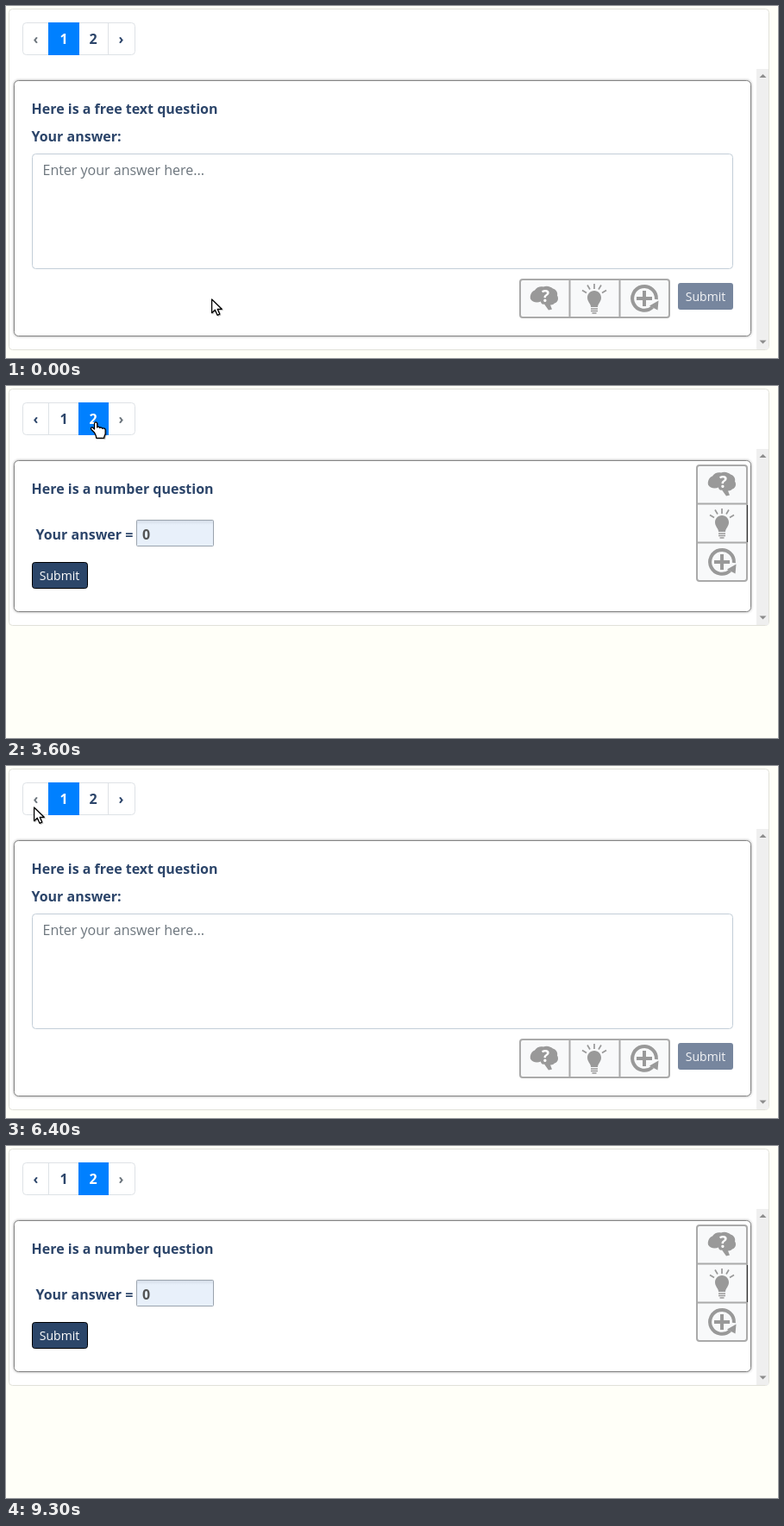
Animation of 895x408 px, one loop 9800 ms. Source, as an HTML page:

```html
<!DOCTYPE html>
<html lang="en">
<head>
<meta charset="utf-8">
<title>Question pager</title>
<style>
  html, body { margin: 0; width: 100%; height: 100%; overflow: hidden; background: #fffff8; }
  svg { display: block; width: 895px; height: 408px; font: 16px "Open Sans", sans-serif; }
  .bold { font-weight: 700; fill: #2c456a; }
  .mid { text-anchor: middle; }
</style>
</head>
<body>
<svg id="stage" viewBox="0 0 895 408">
  <defs>
    <filter id="glow" x="-5%" y="-5%" width="110%" height="115%">
      <feDropShadow dx="0" dy="0" stdDeviation="1.6" flood-color="#000" flood-opacity=".4"/>
    </filter>
    <filter id="soft" x="-30%" y="-30%" width="180%" height="180%">
      <feDropShadow dx="1" dy="1" stdDeviation=".7" flood-color="#000" flood-opacity=".25"/>
    </filter>
    <linearGradient id="inset" x2="0" y2="1">
      <stop offset="0" stop-color="#d3dbe6"/>
      <stop offset=".18" stop-color="#e8f0fa"/>
    </linearGradient>
    <g id="brain">
      <path fill="#999" d="M-16 1C-17-4-14-8-11-9C-9-13-4-14-1-13C3-15 8-13 10-11C14-10 16-6 15-3C17 0 16 5 12 6C10 8 8 8 7 8L9 13L5 14L0 7C-2 8-4 6-4 4C-8 6-14 5-16 1Z"/>
      <text class="mid" x="1.5" y="4" font-size="19" font-weight="700" fill="#fff">?</text>
    </g>
    <g id="bulb" fill="#999">
      <path d="M0-9C5-9 8-5 8-1C8 4 4 6 4 10H-4C-4 6-8 4-8-1C-8-5-5-9 0-9Z"/>
      <path fill="none" stroke="#999" stroke-width="1.6" d="M-4 12H4M-4 14.5H4M-2.5 17H2.5"/>
      <path fill="none" stroke="#999" stroke-width="1.7" d="M0-17V-11M-8-15.500L-5-10.500M8-15.500L5-10.500M-14-9.500L-9-6.500M14-9.500L9-6.500"/>
    </g>
    <g id="retry" fill="none" stroke="#999" stroke-width="4">
      <path d="M13.900 1A13.900 13.900 0 1 0 9.500 10.100M-9 0H9M0-9V9"/>
      <path fill="#999" stroke="none" d="M16.500 2.500L15.500 13.500L6 8.500Z"/>
    </g>
  </defs>
  <g id="free"></g>
  <g id="number"></g>
  <g id="pager"></g>
  <g id="cursor" filter="url(#soft)" stroke-linejoin="round">
    <path id="arrow" fill="#fff" stroke="#000" stroke-width="1.3" d="M.600 1V16.700L4.300 13.300L7 19.300L9.700 18.100L7.200 12.300H12.200Z"/>
    <path id="hand" fill="#fff" stroke="#000" stroke-width="1.3" d="M-1.500 12L-5 8.500C-6.500 6.500-4.500 5-3 6.500L-1.500 8V1.500C-1.500-.500 1.700-.500 1.700 1.500V6C2.500 4.800 4.500 5.200 4.700 6.500C5.700 5.500 7.500 6 7.800 7.300C9 6.500 11.200 7.300 11.200 9V13C11.200 15 9.700 15.500 9.700 18.300H.700C.700 15.500-.500 14-1.500 12Z"/>
    <g id="beam" fill="none">
      <path stroke="#fff" stroke-width="3.500" d="M-3.500-7H3.500M0-7V8M-3.500 8H3.500"/>
      <path stroke="#000" stroke-width="1.800" d="M-3.500-7H3.500M0-7V8M-3.500 8H3.500"/>
    </g>
  </g>
</svg>
<script>
const LOOP = 9800;
const $ = id => document.getElementById(id);

const rect = (x, y, w, h, fill, stroke = 'none', r = 0, extra = '') =>
  `<rect x="${x}" y="${y}" width="${w}" height="${h}" rx="${r}" fill="${fill}" stroke="${stroke}" ${extra}/>`;
const text = (x, y, str, attrs = 'class="bold"') => `<text x="${x}" y="${y}" ${attrs}>${str}</text>`;
const line = (d, color, width = 1) => `<path d="${d}" stroke="${color}" stroke-width="${width}" fill="none"/>`;
const icon = (id, x, y) => `<use href="#${id}" x="${x}" y="${y}"/>`;

// Panel, scrollbar and card, down to the given panel bottom
function frame(bottom) {
  const tip = bottom - 6.5;
  return rect(3.5, 3.5, 881, bottom - 3, '#fff', '#e1e1d9', 4) +
    rect(870, 73, 14, bottom - 73, '#efefef') +
    `<path fill="#8c8c8c" d="M873.500 83L877.500 79L881.500 83ZM873.500 ${tip - 4}L877.500 ${tip}L881.500 ${tip - 4}Z"/>` +
    rect(9.5, 86.5, 854, bottom - 102, '#fff', '#858585', 5, 'filter="url(#glow)"');
}

const submit = (x, y, fill, stroke, color) =>
  rect(x + .5, y + .5, 64, 30, fill, stroke, 3) +
  text(x + 32, y + 21, 'Submit', `class="mid" font-size="14" fill="${color}"`);

$('free').innerHTML = frame(398) +
  text(29.5, 125, 'Here is a free text question') +
  text(29.5, 156.5, 'Your answer:') +
  rect(30.5, 171.5, 812, 133, '#fff', '#c3ced8', 4) +
  text(42.5, 196, 'Enter your answer here...', 'fill="#6c757d"') +
  rect(596, 317, 173, 44, '#f8f9fa', '#aaa', 3, 'stroke-width="2"') +
  line('M653.500 317V361M711.500 317V361', '#aaa', 2) +
  icon('brain', 624, 338.5) + icon('bulb', 682, 339) + icon('retry', 740, 339) +
  rect(779, 321, 64, 31, '#77869e', 'none', 3) +
  text(811, 342, 'Submit', 'class="mid" font-size="14" fill="#f4f5f7"');

$('number').innerHTML = frame(277) +
  text(29.5, 125, 'Here is a number question') +
  text(34.5, 178, 'Your answer =') +
  rect(151.5, 155.5, 89, 30, 'url(#inset)', '#9aa3ad', 1) +
  text(158, 178, '0', 'font-weight="700" fill="#555"') +
  submit(30, 204, '#2c4669', '#000', '#fff') +
  rect(801, 92, 58, 134, '#f8f9fa', '#aaa', 3, 'stroke-width="2"') +
  line('M801 136.500H859M801 181.500H859', '#aaa', 2) +
  line('M859.500 138V181', '#333') +
  icon('brain', 830, 113.500) + icon('bulb', 830, 159) + icon('retry', 830, 204);

const EDGES = [19, 49, 84, 118, 149];
const LABELS = ['‹', '1', '2', '›'];
const CENTERS = [34.5, 67, 101, 133.5];

function drawPager(page, hover, focus) {
  const disabled = page === 1 ? 0 : 3;
  let out = rect(19.5, 19.5, 130, 37, '#fff', '#dee2e6', 4);
  if (hover >= 0 && hover !== page && hover !== disabled) {
    const x = EDGES[hover];
    out += rect(x + .5, 19.5, EDGES[hover + 1] - x, 37, '#e9ecef', '#dee2e6', hover % 3 ? 0 : 4);
  }
  out += line('M49.500 20V56M84.500 20V56M118.500 20V56', '#dee2e6');
  const width = page === 1 && hover === 2 ? 35 : EDGES[page + 1] - EDGES[page] + 1;
  out += rect(EDGES[page], 19, width, 38, '#0080ff');
  if (focus) out += rect(117, 17.5, 34, 41, 'none', '#bfdeff', 5, 'stroke-width="3"');
  LABELS.forEach((label, i) => {
    const fill = i === page ? '#fff' : i === disabled ? '#6c757d' : i === hover ? '#0056b3' : '#2c456a';
    out += text(CENTERS[i], 44, label, `class="mid" font-weight="700" fill="${fill}"`);
  });
  $('pager').innerHTML = out;
}

// Pointer moves: start time, number of 100 ms steps, then start, control and end points
const MOVES = [
  [900, 7, [238, 339], [215, 240], [156, 192]],
  [1900, 6, [156, 192], [140, 120], [110, 73]],
  [2600, 3, [110, 73], [107, 58], [104, 42]],
  [4900, 10, [104, 42], [80, 104], [39, 49]],
  [5900, 1, [39, 49], [35, 48], [32, 47]],
  [7000, 10, [32, 47], [70, 80], [127, 56]],
  [8000, 2, [127, 56], [130, 53], [132, 50]],
  [9000, 4, [132, 50], [114, 14], [96, -24]]
];

function pointerAt(t) {
  const move = MOVES.filter(m => m[0] <= t).pop();
  if (!move) return MOVES[0][2];
  const [start, steps, a, c, b] = move;
  const k = Math.min(1, (Math.floor((t - start) / 100) + 1) / steps);
  const u = k * k * (3 - 2 * k);
  return [0, 1].map(i => Math.round((1 - u) ** 2 * a[i] + 2 * u * (1 - u) * c[i] + u * u * b[i]));
}

const inside = (x, y, l, t, r, b) => x >= l && x < r && y >= t && y < b;

let last = '';
function render(t) {
  const page = (t >= 3600 && t < 6400) || t >= 8600 ? 2 : 1;
  const [x, y] = pointerAt(t);
  const hover = y >= 19 && y < 56 ? EDGES.findIndex((e, i) => x >= e && x < EDGES[i + 1]) : -1;
  const focus = t >= 8500 && t < 8600;
  const onLink = hover >= 0 && hover !== (page === 1 ? 0 : 3);
  const onText = page === 1 &&
    (inside(x, y, 30, 171, 843, 305) || inside(x, y, 30, 108, 246, 130));
  const kind = onLink ? 'hand' : onText ? 'beam' : 'arrow';

  const state = [page, x, y, focus].join();
  if (state === last) return;
  last = state;
  $('free').style.display = page === 1 ? '' : 'none';
  $('number').style.display = page === 2 ? '' : 'none';
  drawPager(page, hover, focus);
  for (const id of ['arrow', 'hand', 'beam']) $(id).style.display = id === kind ? '' : 'none';
  $('cursor').setAttribute('transform', `translate(${x} ${y})`);
}

const begin = performance.now();
function tick() {
  render((performance.now() - begin) % LOOP);
  requestAnimationFrame(tick);
}
tick();
</script>
</body>
</html>
```
